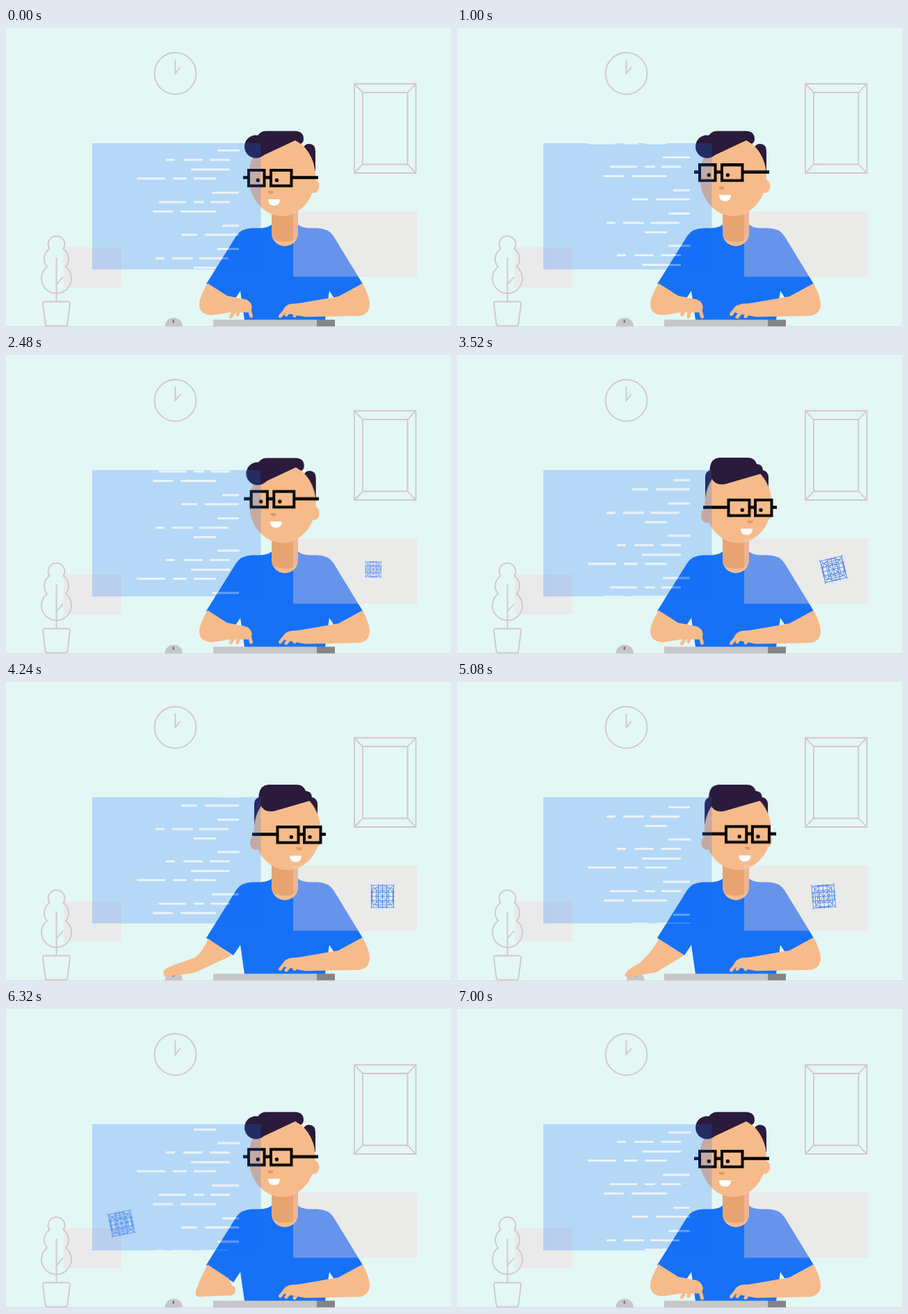
An HTML page for the animation above (7.04 s loop, 640 by 431 pixels).

```html
<!DOCTYPE html>
<html lang="en">
<head>
<meta charset="utf-8">
<title>Developer at work</title>
<style>
  html, body { margin: 0; width: 100%; height: 100%; overflow: hidden; background: #e3f7f5; }
  svg { display: block; width: 100vw; height: 100vh; }
  .decor { fill: none; stroke: #d2c6c9; stroke-width: 1.8; }
  .skin { fill: #f6bb8b; }
  .hair { fill: #2a1a3b; }
  .shirt { fill: #1671f7; }
  .fingers path { fill: none; stroke: #f6bb8b; stroke-width: 5; stroke-linecap: round; }
  .grey { fill: rgb(246, 211, 214); opacity: .36; }

  .turn, .slide, .nod, .faceL, .faceR, .scroll, .arm, .mouse, .typing, .grid {
    animation: 7040ms cubic-bezier(.37, 0, .63, 1) infinite;
  }

  /* Head turn: parts travel from --a to --b and back */
  .turn { animation-name: turn; }
  @keyframes turn {
    0%, 32.2%, 84.8%, 100% { transform: translateX(var(--a, 0px)); }
    47.8%, 69.2% { transform: translateX(var(--b, 0px)); }
  }
  .slide { animation-name: slide; }
  @keyframes slide {
    0%, 32.2%, 84.8%, 100% { x: var(--x0); width: var(--w0); }
    47.8%, 69.2% { x: var(--x1); width: var(--w1); }
  }
  .faceL { animation-name: faceL; }
  @keyframes faceL {
    0%, 39.99%, 77%, 100% { opacity: 1; }
    40%, 76.99% { opacity: 0; }
  }
  .faceR { animation-name: faceR; }
  @keyframes faceR {
    0%, 39.99%, 77%, 100% { opacity: 0; }
    40%, 76.99% { opacity: 1; }
  }
  .nod { animation-name: nod; }
  @keyframes nod {
    0%, 100% { transform: none; }
    14.2% { transform: translateY(calc(var(--k) * -7.5px)); }
    21.3%, 32.2% { transform: translateY(calc(var(--k) * -9.5px)); }
    47.8%, 69.2% { transform: translateY(calc(var(--k) * 4px)); }
    84.8% { transform: translateY(calc(var(--k) * -3.5px)); }
  }

  .scroll { animation-name: scroll; animation-timing-function: linear; }
  @keyframes scroll {
    0% { transform: none; }
    14.2% { transform: translateY(-51px); }
    35.23% { transform: translateY(-83px); }
    50% { transform: translateY(-104.5px); }
    72.16% { transform: translateY(-138px); }
    81.82% { transform: translateY(-159px); }
    99.43% { transform: translateY(-187px); }
    100% { transform: translateY(-188.5px); }
  }

  /* Left arm: keyboard, mouse, drag, keyboard */
  .arm { animation-name: arm; }
  @keyframes arm {
    0%, 52%, 92.5%, 100% { d: path("M290 368C283 380 278 390 278 399C278 409 286 414 297 414L322 410L348 410C357 408 355 394 344 391L318 386Z"); }
    60%, 84.8% { d: path("M291 370C286 381 280 391 272 397C256 404 228 410 226 418L228 425L258 421C266 420 272 419 276 417L325 394Z"); }
    69.2% { d: path("M290 371C284 382 275 393 262 406C252 411 243 417 243 424L248 427L272 421C282 419 285 420 290 417L327 394Z"); }
  }
  .mouse { animation-name: mouse; }
  @keyframes mouse {
    0%, 60%, 84.8%, 100% { transform: none; }
    69.2% { transform: translateX(17px); }
  }
  .typing { animation-name: typing; }
  @keyframes typing {
    0%, 52%, 92.5%, 100% { opacity: 1; }
    52.5%, 92% { opacity: 0; }
  }
  .fingers path { animation: tap 220ms ease-in-out infinite; }
  .fingers path:nth-child(2) { animation-delay: -110ms; }
  .fingers path:nth-child(3) { animation-delay: -60ms; }
  @keyframes tap { 50% { transform: translateY(-3px); } }

  .grid {
    fill: none; stroke: #4583ec; stroke-width: .8;
    animation-name: gridMove, gridSpin, gridSize;
  }
  @keyframes gridMove {
    0%, 31.5% { translate: 515px 309px; }
    39%, 70.4% { translate: 541.5px 309px; }
    84.5%, 100% { translate: 166px 309px; }
  }
  @keyframes gridSpin {
    0%, 34% { rotate: 0deg; }
    55.5%, 61.2% { rotate: 90deg; }
    74%, 80.5% { rotate: 180deg; }
    92.6%, 100% { rotate: 270deg; }
  }
  @keyframes gridSize {
    0%, 31.5%, 98.5%, 100% { scale: 0; }
    37.5%, 93% { scale: 1; }
  }
</style>
</head>
<body>
<svg viewBox="0 0 640 431" preserveAspectRatio="none">
  <defs>
    <clipPath id="panel"><path d="M124 166H366V348H124Z"/></clipPath>
    <clipPath id="open"><path d="M124 166H366V288H350Q340 289 333 297L301 348H124Z"/></clipPath>
    <g id="code"></g>
  </defs>

  <rect width="640" height="431" fill="#e3f7f5"/>

  <g class="decor">
    <circle cx="243.5" cy="65.5" r="30"/>
    <path d="M243.5 45.500V65.500L251 56.500"/>
    <path d="M501 80.500H589.500V209H501ZM513 93H577.500V196.500H513ZM501 80.500L513 93M589.500 80.500L577.500 93M501 209L513 196.500M589.500 209L577.500 196.500"/>
  </g>
  <rect class="grey" x="83" y="316" width="83" height="58"/>
  <g class="decor">
    <path d="M62.500 318.600A12 12 0 1 1 82.500 318.600A17.500 17.500 0 0 1 85.900 344.200A21.500 21.500 0 1 1 59.100 344.200A17.500 17.500 0 0 1 62.500 318.600Z"/>
    <path d="M72.500 331V394M73 369L82 359"/>
    <path d="M56 394.500H89Q92.500 394.500 92 398L88.500 426Q88 429.500 85 429.500H60Q57 429.500 56.500 426L53 398Q52.500 394.500 56 394.500Z"/>
  </g>
  <path d="M0 430.500H640" stroke="#d9dcdc"/>

  <!-- Body -->
  <path class="shirt" d="M288 369L331 300Q338 289 354 288.500H366Q376 288 382 283.500H420Q426 288 436 288.500H448Q464 289 471 300L513 369L475 394L465 379L459 421H343L337 379L327 394Z"/>
  <path class="skin" d="M382 250H420V295.500A19 19 0 0 1 382 295.500Z"/>
  <path fill="#e7a471" d="M382 250H420V296Q420 308 401 308Q382 308 382 296Z"/>

  <!-- Head -->
  <g class="faceL">
    <path class="hair turn" style="--b:8px" d="M426 180Q427 167 436 167Q445 167 445 178V206H426Z"/>
  </g>
  <g class="faceR">
    <path class="hair turn" style="--a:-10px" d="M357 205V177Q357 166 367 166H439Q448 167 448 177V196L440 205Z"/>
  </g>
  <ellipse class="skin turn" style="--b:3px" cx="442.500" cy="228" rx="8" ry="10"/>
  <ellipse class="skin turn" style="--a:4px" cx="358.500" cy="231.500" rx="7.500" ry="10.500"/>
  <ellipse class="skin turn" style="--b:7.500px" cx="397" cy="214" rx="48" ry="57"/>
  <g class="faceL">
    <circle class="hair turn" style="--b:27px" cx="359.500" cy="171" r="16.500"/>
    <path class="hair turn" style="--b:8px" d="M361 157Q365 148.500 374 148.500H416Q428 149 428 160Q428 165 424 167L416 162L367 185Z"/>
  </g>
  <g class="faceR">
    <path class="hair turn" style="--a:-16px" d="M377 148H418Q428 148 431 157Q440 158 440 166Q440 170 436 171.500L386 186Q371 189 366 177Q362 171 364 161Q366 149 377 148Z"/>
  </g>
  <g class="nod" style="--k:.85">
    <path class="turn" style="--b:41px" fill="#e09a66" d="M376 235H385Q384 239.500 380.500 239.500Q377 239 376 235Z"/>
    <path class="turn" style="--b:31px" fill="#fff" d="M377 247H394Q394 256 385.500 256Q377 256 377 247Z"/>
  </g>
  <g class="nod" style="--k:1">
    <g fill="#060606">
      <rect class="slide" y="213.300" height="4.500" style="--x0:341px;--w0:7px;--x1:354px;--w1:36px"/>
      <rect class="slide" y="213.300" height="4.500" style="--x0:373px;--w0:7px;--x1:421px;--w1:8px"/>
      <rect class="slide" y="213.300" height="4.500" style="--x0:411px;--w0:38px;--x1:453px;--w1:7px"/>
      <circle class="turn" style="--b:48px" cx="362.300" cy="219.500" r="2.700"/>
      <circle class="turn" style="--b:47.500px" cx="389.500" cy="219.500" r="2.700"/>
    </g>
    <g fill="none" stroke="#060606" stroke-width="4">
      <rect class="slide" y="205" height="22.500" style="--x0:349px;--w0:22.500px;--x1:390.500px;--w1:30px"/>
      <rect class="slide" y="205" height="22.500" style="--x0:381px;--w0:29.500px;--x1:429px;--w1:23.500px"/>
    </g>
  </g>

  <!-- Desk and arms -->
  <g class="mouse">
    <path fill="#c6c7c8" d="M228.500 430A12.500 12 0 0 1 254 430Z"/>
    <rect x="239.500" y="420.500" width="2.500" height="4.500" rx="1" fill="#77787a"/>
  </g>
  <path class="skin arm" d="M290 368C283 380 278 390 278 399C278 409 286 414 297 414L322 410L348 410C357 408 355 394 344 391L318 386Z"/>
  <g class="fingers typing">
    <path d="M329 407L323.500 416"/>
    <path d="M335 407L333 416"/>
    <path d="M349 403L352.500 417"/>
  </g>
  <path class="skin" d="M513 368C519 380 523 390 523 398C523 409 516 415 505 415L430 416.500L402 411C396 408 400 399 411 397.500L420 397L478 387Z"/>
  <g class="fingers">
    <path d="M403 405L394.500 415.500"/>
    <path d="M410 408L403 416.500"/>
    <path d="M419 411L415 416.500"/>
  </g>
  <path fill="#c6c7c8" d="M298 420.500H447V430H298Z"/>
  <path fill="#848586" d="M447 420.500H473V430H447Z"/>

  <!-- Screens -->
  <rect x="124" y="166" width="242.500" height="182" fill="#1670fa" opacity=".22"/>
  <rect class="grey" x="413" y="264.500" width="178.500" height="94"/>
  <g fill="#fff">
    <g clip-path="url(#panel)" opacity=".33"><use class="scroll" href="#code"/></g>
    <g clip-path="url(#open)" opacity=".58"><use class="scroll" href="#code"/></g>
  </g>

  <g class="grid">
    <path d="M-16 -16H16V16H-16ZM-9 -9H9V9H-9ZM-17.500 -17.500L17.500 17.500M17.500 -17.500L-17.500 17.500M0 -17.500V17.500M-17.500 0H17.500M-6 -17.500V17.500M6 -17.500V17.500M-17.500 -6H17.500M-17.500 6H17.500"/>
    <circle r="15.500"/>
    <circle r="7.500"/>
    <rect x="-12" y="-15" width="24" height="30" rx="2"/>
  </g>
</svg>
<script>
  // Each row: y, then start and end of every dash
  const rows = [
    [176.5, 304, 336],
    [190, 230, 243, 255, 283, 293, 322],
    [204, 266, 322],
    [217, 188, 229, 240, 260, 270, 302],
    [237.5, 296, 335],
    [251, 220, 259, 270, 285, 294, 322],
    [264.5, 211, 240, 251, 302],
    [285, 311, 335],
    [298, 252, 275, 286, 335],
    [318.5, 304, 335],
    [332, 215, 228, 239, 269, 278, 320],
    [345.5, 270, 302]
  ];
  const period = 188.5;
  const code = document.getElementById('code');
  for (const shift of [0, period]) {
    for (const [y, ...xs] of rows) {
      for (let i = 0; i < xs.length; i += 2) {
        const dash = document.createElementNS(code.namespaceURI, 'rect');
        const box = { x: xs[i], y: y + shift - 1.6, width: xs[i + 1] - xs[i], height: 3.2, rx: 0.8 };
        for (const key in box) dash.setAttribute(key, box[key]);
        code.append(dash);
      }
    }
  }
</script>
</body>
</html>
```
